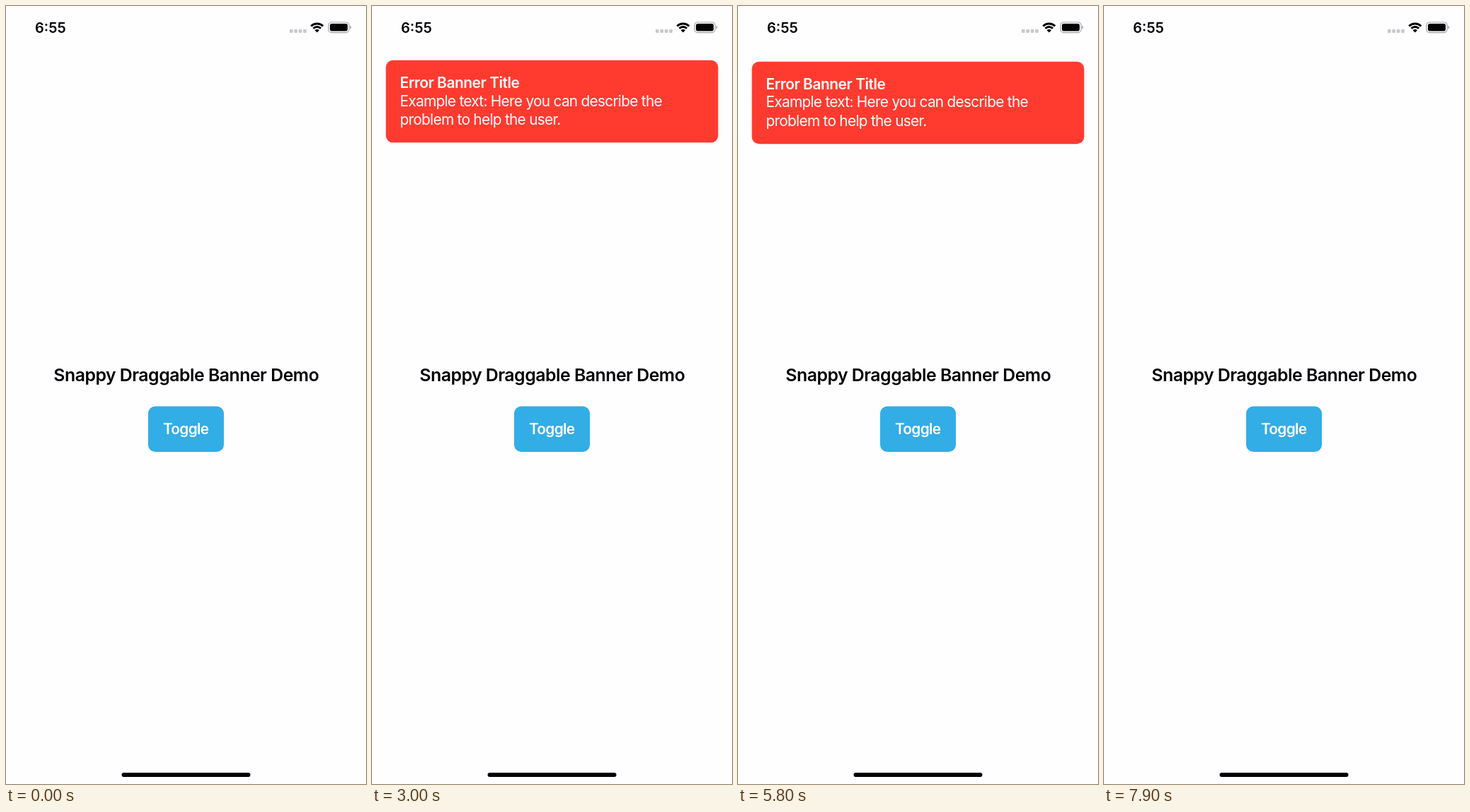
An HTML page for the animation above (8 s loop, 509 by 1101 pixels).

```html
<!DOCTYPE html>
<html lang="en">
<head>
<meta charset="utf-8">
<title>Draggable banner</title>
<style>
html, body { margin: 0; width: 100%; height: 100%; overflow: hidden; background: #fefdff; }
svg { display: block; width: 100vw; height: 100vh; }
text { font-family: Inter, "Liberation Sans", sans-serif; font-optical-sizing: none; }
.strong { font-weight: 600; }
.banner text { font-size: 20.8px; fill: #fff; }
.body { letter-spacing: -.7px; }
</style>
</head>
<body>
<svg viewBox="0 0 509 1101">
  <rect width="509" height="1101" fill="#fefdff"/>

  <text class="strong" x="254.8" y="531" font-size="24.8" letter-spacing="-.48" text-anchor="middle">Snappy Draggable Banner Demo</text>
  <g id="button">
    <rect x="201" y="566.5" width="107" height="64.5" rx="10" fill="#32ade6"/>
    <text class="strong" x="254.2" y="606" font-size="20.8" letter-spacing="-.65" text-anchor="middle" fill="#fff">Toggle</text>
  </g>

  <g id="banner" class="banner">
    <rect x="19.6" width="469.8" height="116.5" rx="10" fill="#ff3b30"/>
    <text class="strong" x="39.5" y="39.5" letter-spacing="-.4">Error Banner Title</text>
    <text class="body" x="39.5" y="64.8">Example text: Here you can describe the</text>
    <text class="body" x="39.5" y="91.5">problem to help the user.</text>
  </g>

  <text class="strong" x="41" y="37.6" font-size="20">6:55</text>
  <g fill="#c8c7cb">
    <rect x="401" y="33" width="4.6" height="5" rx="1.3"/>
    <rect x="407.4" y="33" width="4.6" height="5" rx="1.3"/>
    <rect x="413.8" y="33" width="4.6" height="5" rx="1.3"/>
    <rect x="420.2" y="33" width="4.6" height="5" rx="1.3"/>
  </g>
  <g transform="translate(439.8 37)" fill="none" stroke="#000" stroke-width="3">
    <path d="M-8.5-8.5A12 12 0 0 1 8.5-8.5"/>
    <path d="M-5.3-5.3A7.5 7.5 0 0 1 5.3-5.3"/>
    <path d="M0 .6L-3.1-2.6A4.3 4.3 0 0 1 3.1-2.6Z" fill="#000" stroke="none"/>
  </g>
  <rect x="456" y="23" width="29" height="14.6" rx="4.4" fill="none" stroke="#a3a2a6" stroke-width="1.2"/>
  <rect x="458" y="25" width="25" height="10.6" rx="2.8"/>
  <path d="M486.4 27.8q1.8.8 1.8 2.5t-1.8 2.5z" fill="#a3a2a6"/>
  <rect x="163.5" y="1085" width="182" height="6" rx="3"/>
</svg>
<script>
const LOOP = 8000, STEP = 100;
const REST = 78.7, HIDDEN = -130;
const HALF = 220, DECAY = .685;   // spring half period and damping

const banner = document.getElementById('banner');
const button = document.getElementById('button');

// Each drag: start, release, distance pulled down
const drags = [
  [2333, 2650, 150],
  [3200, 4600, 291.3],
  [5850, 6466, 670],
  [7020, 7335, 318]
];

function spring(ms) {
  const p = Math.PI * ms / HALF;
  return Math.exp(-DECAY * p) * (Math.cos(p) + DECAY * Math.sin(p));
}

function smooth(u) {
  return u * u * (3 - 2 * u);
}

function bannerY(t) {
  if (t < 650 || t >= 7900) return HIDDEN;
  if (t > 7740) {
    const u = (t - 7740) / 160;
    return REST + (HIDDEN - REST) * u * u;
  }
  let y = REST + (HIDDEN - REST) * spring(t - 650);
  for (const [start, release, pull] of drags) {
    if (t <= start) continue;
    y += pull * (t < release ? smooth((t - start) / (release - start)) : spring(t - release));
  }
  return y;
}

function draw(t) {
  banner.setAttribute('transform', `translate(0 ${bannerY(t).toFixed(2)})`);
  button.setAttribute('opacity', t >= 500 && t < 700 ? .97 : 1);
}

const began = performance.now();
function tick() {
  const t = (performance.now() - began) % LOOP;
  draw(Math.floor(t / STEP) * STEP);
  requestAnimationFrame(tick);
}
draw(0);
requestAnimationFrame(tick);
</script>
</body>
</html>
```
